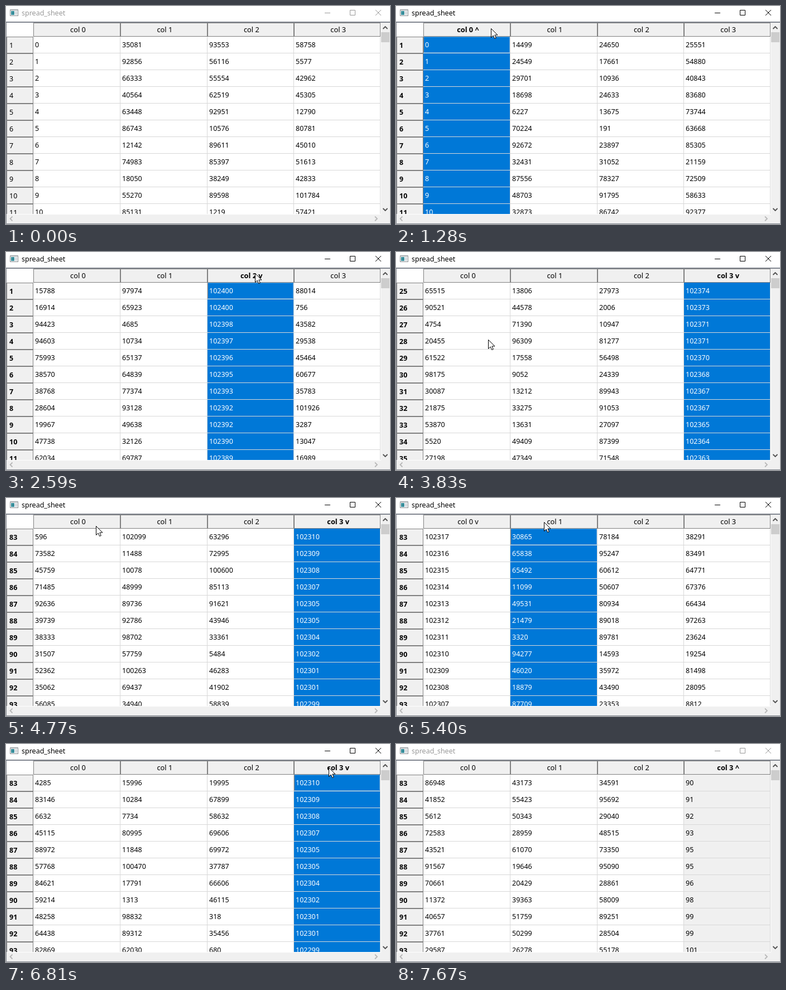
Animation, 688 px wide and 391 px high, one loop 7750 ms. Source, as an HTML page:

```html
<!DOCTYPE html>
<html lang="en">
<head>
<meta charset="utf-8">
<title>spread_sheet</title>
<style>
  html, body { margin: 0; width: 100%; height: 100%; overflow: hidden; background: #fff; }
  svg { display: block; width: 688px; height: 391px; }
  text { font: 12.5px "Noto Sans", "Open Sans", sans-serif; white-space: pre; }
  .head { font-size: 12.8px; text-anchor: middle; }
  .bold { font-weight: 700; }
</style>
</head>
<body>
<svg id="stage" viewBox="0 0 688 391"></svg>
<script>
const LOOP = 7750, ROWS = 11, ROW_H = 30, TOP = 55, MAX = 102400;
const EDGES = [49, 205, 361, 516, 671];
const GRAY = '#808080', FACE = '#f0f0f0', GRID = '#d8d8d8', BLUE = '#0078d7';

// [time, column]: a press selects the column, a sort reorders the sheet by it.
const presses = [[910, 0], [1650, 1], [2140, 2], [2820, 3], [4930, 0], [5400, 1], [6100, 2], [6580, 3]];
const sorts = [[990, 0], [1280, 0], [1830, 1], [2210, 2], [2900, 3],
  [5010, 0], [5650, 1], [6180, 2], [6660, 3], [6960, 3]];

const scrollPath = [[3500, 0], [3830, 24], [4150, 58], [4600, 82]];
const cursorPath = [
  [70, 330, 386], [480, 215, 150], [820, 165, 42], [1130, 170, 40], [1370, 170, 40],
  [1650, 285, 43], [1900, 290, 42], [2140, 425, 38], [2360, 445, 38], [2590, 445, 38],
  [2820, 575, 43], [3210, 570, 42], [3830, 165, 157], [4450, 165, 150], [4770, 161, 50],
  [5180, 140, 42], [5400, 265, 43], [5880, 290, 42], [6100, 410, 37], [6380, 422, 40],
  [6580, 570, 42], [6990, 585, 42], [7360, 688, 372]
];

const stage = document.getElementById('stage');
function add(tag, attrs, content = '') {
  const node = document.createElementNS('http://www.w3.org/2000/svg', tag);
  for (const key in attrs) node.setAttribute(key, attrs[key]);
  node.textContent = content;
  return stage.appendChild(node);
}
const rect = (x, y, width, height, fill, more) => add('rect', { x, y, width, height, fill, ...more });
const path = (d, stroke, more) => add('path', { d, stroke, fill: 'none', ...more });
const label = (x, y, content, more) => add('text', { x, y, ...more }, content);
const boxed = (x, y, w, h) => rect(x + .5, y + .5, w - 1, h - 1, FACE, { stroke: GRAY });
const setText = (node, value) => { if (node.textContent !== value) node.textContent = value; };
const lastIndex = (events, t) => events.filter(e => e[0] <= t).length - 1;

function sample(points, t) {
  if (t <= points[0][0]) return points[0].slice(1);
  const i = points.findIndex(p => p[0] > t);
  if (i < 0) return points[points.length - 1].slice(1);
  const a = points[i - 1], b = points[i], k = (t - a[0]) / (b[0] - a[0]);
  return a.slice(1).map((v, j) => v + (b[j + 1] - v) * k);
}
const firstRow = t => Math.round(sample(scrollPath, t)[0]) + 1;

function randomValue(seed) {
  const noise = Math.sin(seed) * 43758.5453;
  return Math.floor((noise - Math.floor(noise)) * MAX);
}

// Column 0 holds unique ids; the others hold random values with repeats.
function cellValue(order, row, col, sorted, mark) {
  if (col === 0 && sorted <= 0) return mark === 'v' ? MAX - row : row - 1;
  if (col !== sorted) return randomValue(order * 37.7 + row * 12.9898 + col * 78.233);
  const rank = Math.max(0, Math.floor(row * 1.1 - 1 + Math.sin(row * 1.9) / 2));
  return mark === 'v' ? MAX - rank : rank;
}

// Table
rect(0, 0, 688, 391, '#fff');
const selection = rect(0, TOP, 155, 319, BLUE);
for (let r = 0; r < ROWS; r++) rect(49, TOP + r * ROW_H + 29, 622, 1, GRID);
for (const x of EDGES.slice(1)) rect(x - 1, TOP, 1, 319, GRID);
const dots = { 'stroke-dasharray': '1 1', 'stroke-dashoffset': 1 };
const focusBox = path('', '#a8cdec', dots);
const focusEdge = path('', '#ff8728', dots);
const rowLabels = [], cells = [];
for (let r = 0; r < ROWS; r++) {
  const y = TOP + r * ROW_H;
  boxed(1, y, 48, ROW_H);
  rowLabels.push(label(6, y + 20));
  cells.push(EDGES.slice(0, 4).map(x => label(x + 3, y + 19)));
}
const heads = EDGES.slice(0, 4).map((x, c) => {
  boxed(x, 30, EDGES[c + 1] - x, 25);
  return label(129 + c * 155.4, 47, '', { class: 'head' });
});

// Scroll bars and frame
rect(672, 30, 16, 361, FACE);
rect(0, 374, 688, 17, FACE);
rect(1, 373, 671, 1, '#fff');
rect(672, 47, 15, 18, '#cdcdcd');
path('M675.5 41 679.5 37 683.5 41M675.5 363 679.5 367 683.5 363', '#505050', { 'stroke-width': 1.8 });
path('M11.5 377.5 7.5 381.5 11.5 385.5M661 377.5 665 381.5 661 385.5', '#b8b8b8', { 'stroke-width': 1.8 });
rect(0, 28, 688, 2, '#828790');
path('M.5 29V390.5H688', '#828790');

// Title bar
rect(7.5, 6.5, 14, 11, '#fff', { stroke: '#878b8e' });
rect(7, 6, 15, 2, '#a5a9ac');
rect(9, 9, 6, 7, '#3a8f9c');
rect(16, 9, 4, 7, '#d5dade');
const title = label(28, 17, 'spread_sheet', { 'font-size': 12.4 });
const buttons = path('M571 12.5H581M616.5 7.5H625.5V16.5H616.5ZM662 7 672 17M672 7 662 17', '#000');

const cursor = path('M.5 .5V16.5L4.2 13 6.7 18.5 9.3 17.4 6.9 12H12Z', '#000', { fill: '#fff' });

function drawSelection(selected, active, focused) {
  selection.style.display = selected < 0 ? 'none' : '';
  focusBox.style.display = focusEdge.style.display = focused ? '' : 'none';
  if (selected < 0) return;
  const x = EDGES[selected], width = EDGES[selected + 1] - x - 1;
  selection.setAttribute('x', x);
  selection.setAttribute('width', width);
  selection.setAttribute('fill', active ? BLUE : FACE);
  focusBox.setAttribute('d', `M${x} 55.5h${width - .5}v28h${.5 - width}`);
  focusEdge.setAttribute('d', `M${x + .5} 55v29`);
}

function draw(t) {
  const active = t >= 820 && t < 7520;
  const first = firstRow(t);
  const press = presses[lastIndex(presses, t)];
  const selected = press ? press[1] : -1;
  const order = lastIndex(sorts, t);
  const sorted = order < 0 ? -1 : sorts[order][1];
  const repeated = order > 0 && sorts[order - 1][1] === sorted;
  const mark = order < 0 ? '' : repeated ? '^' : 'v';

  const chrome = active ? '#000' : '#999';
  title.setAttribute('fill', chrome);
  buttons.setAttribute('stroke', chrome);
  drawSelection(selected, active, active && press && first === firstRow(press[0]));

  heads.forEach((head, c) => {
    setText(head, 'col ' + c + (c === sorted ? ' ' + mark : ''));
    head.classList.toggle('bold', c === selected && c === sorted);
  });
  for (let r = 0; r < ROWS; r++) {
    setText(rowLabels[r], String(first + r));
    rowLabels[r].classList.toggle('bold', selected >= 0);
    cells[r].forEach((cell, c) => {
      setText(cell, String(cellValue(order, first + r, c, sorted, mark)));
      cell.setAttribute('fill', active && c === selected ? '#fff' : '#000');
    });
  }

  const [x, y] = sample(cursorPath, t).map(Math.round);
  cursor.setAttribute('transform', `translate(${x} ${y})`);
  cursor.style.display = t < 70 || t > 7400 ? 'none' : '';
}

const start = performance.now();
function tick() {
  draw((performance.now() - start) % LOOP);
  requestAnimationFrame(tick);
}
tick();
</script>
</body>
</html>
```
